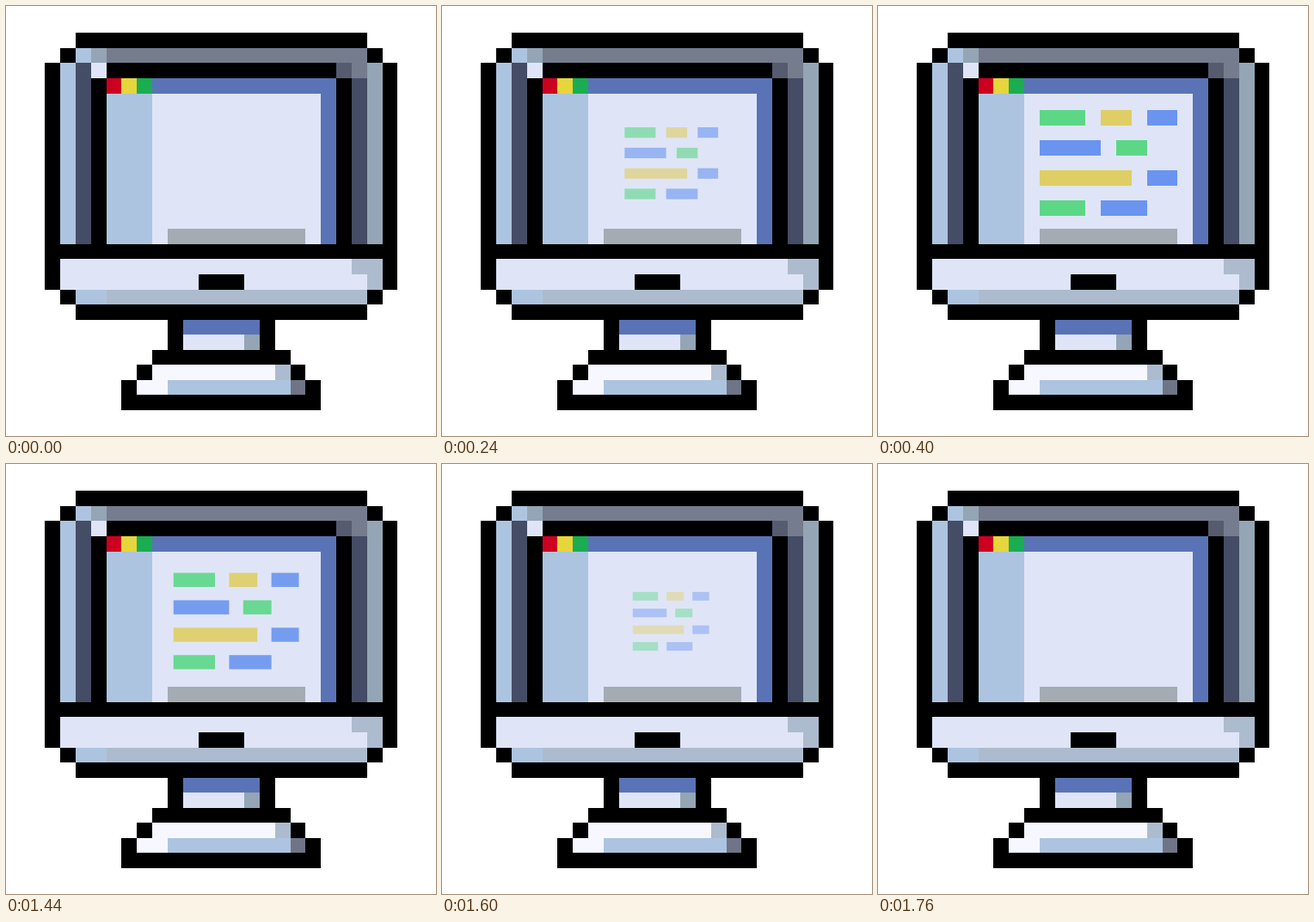
Animation of 500 by 500 pixels, one loop 2.4 s. Source, as an HTML page with a canvas:

```html
<!DOCTYPE html>
<html lang="en">
<head>
<meta charset="utf-8">
<title>Pixel computer</title>
<style>
  html, body { margin: 0; width: 100%; height: 100%; overflow: hidden; background: #fff; }
  canvas { display: block; }
</style>
</head>
<body>
<canvas width="500" height="500"></canvas>
<script>
const ctx = document.querySelector('canvas').getContext('2d');
const LOOP = 2400, STEP = 40;
const SKY = '#adc4e0', STEEL = '#94a5b5', SLATE = '#757c8e', DARK = '#454c66',
  PALE = '#dfe5f7', MIST = '#adbbce', FRAME = '#5973b6', WHITE = '#f7f8ff';
const GREEN = '#5cd786', YELLOW = '#dfce63', BLUE = '#6a94f0';

// Art grid to stage pixels
const gridX = c => Math.round(45.35 + 17.826 * c);
const gridY = r => Math.round(31.39 + 17.54 * r);

function block(color, col, row, w = 1, h = 1) {
  const x = gridX(col), y = gridY(row);
  ctx.fillStyle = color;
  ctx.fillRect(x, y, gridX(col + w) - x, gridY(row + h) - y);
}

function drawOutline() {
  block('#000', 2, 0, 19, 19);
  block('#000', 1, 1, 21, 17);
  block('#000', 0, 2, 23, 15);
  block('#000', 8, 19, 7, 2);
  block('#000', 7, 21, 9);
  block('#000', 6, 22, 11);
  block('#000', 5, 23, 13, 2);
}

function drawCase() {
  block(SKY, 2, 1);
  block(STEEL, 3, 1);
  block(SLATE, 4, 1, 17);
  block(SKY, 1, 2, 1, 12);
  block(DARK, 2, 2, 1, 12);
  block(PALE, 3, 2);
  block('#575b6f', 19, 2);
  block(SLATE, 20, 2);
  block(DARK, 20, 3, 1, 11);
  block(STEEL, 21, 2, 1, 12);
  block(PALE, 1, 15, 21, 2);
  block(MIST, 20, 15, 2);
  block(MIST, 21, 16);
  block('#000', 10, 16, 3);
  block(SKY, 2, 17, 2);
  block(MIST, 4, 17, 17);
}

function drawScreen() {
  block(FRAME, 4, 3, 15, 11);
  ['#cd0020', '#e7d53c', '#1aad52'].forEach((color, i) => block(color, 4 + i, 3));
  block(SKY, 4, 4, 3, 10);
  block(PALE, 7, 4, 11, 10);
  block('#a4abb3', 8, 13, 9);
}

function drawStand() {
  block(FRAME, 9, 19, 5);
  block(PALE, 9, 20, 4);
  block(STEEL, 13, 20);
  block(WHITE, 7, 22, 8);
  block(MIST, 15, 22);
  block(WHITE, 6, 23, 2);
  block(SKY, 8, 23, 8);
  block('#6f7486', 16, 23);
}

// Code lines: [color, column, width]
const lines = [
  [[GREEN, 8, 3], [YELLOW, 12, 2], [BLUE, 15, 2]],
  [[BLUE, 8, 4], [GREEN, 13, 2]],
  [[YELLOW, 8, 6], [BLUE, 15, 2]],
  [[GREEN, 8, 3], [BLUE, 12, 3]],
];

function drawCode(shown) {
  const scale = 0.2 + 0.8 * shown;
  ctx.save();
  ctx.globalAlpha = shown;
  ctx.translate(264, 183.5);
  ctx.scale(scale, scale);
  ctx.translate(-264, -183.5);
  lines.forEach((line, i) => line.forEach(([color, col, w]) => {
    ctx.fillStyle = color;
    ctx.fillRect(gridX(col), 121 + 35 * i, gridX(col + w) - gridX(col), 18);
  }));
  ctx.restore();
}

const clamp = v => Math.min(1, Math.max(0, v));

function draw() {
  const t = Math.floor(performance.now() % LOOP / STEP) * STEP;
  ctx.fillStyle = '#fff';
  ctx.fillRect(0, 0, 500, 500);
  drawOutline();
  drawCase();
  drawScreen();
  drawStand();
  drawCode(Math.min(clamp(t / 400), clamp((1760 - t) / 360)));
  requestAnimationFrame(draw);
}
draw();
</script>
</body>
</html>
```
